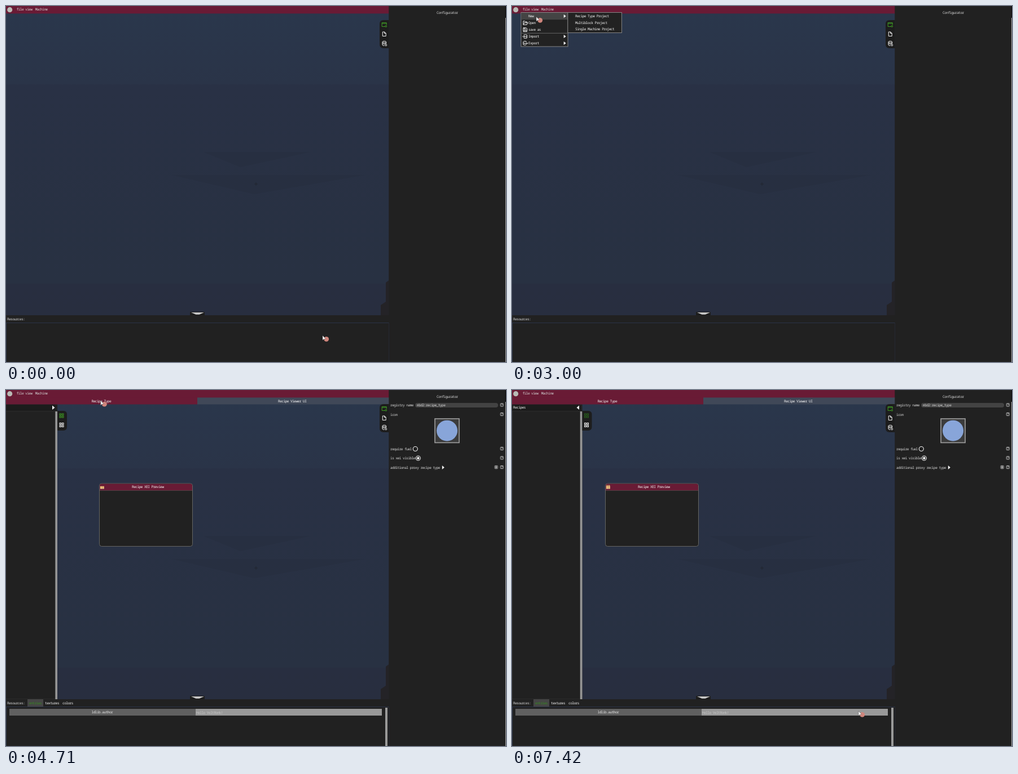
Write an HTML page that moves like this. It is 886 px wide and 632 px high and loops after 7.51 s.

```html
<!DOCTYPE html>
<html lang="en">
<head>
<meta charset="utf-8">
<title>Project editor</title>
<style>
  html, body { margin: 0; width: 100%; height: 100%; overflow: hidden; background: #212121; }
  svg { display: block; width: 886px; height: 632px; }
  text {
    font: 6.2px "Noto Sans Mono", "DejaVu Sans Mono", monospace;
    letter-spacing: -.57px; white-space: pre; text-rendering: geometricPrecision;
  }
</style>
</head>
<body>
<svg id="stage" viewBox="0 0 886 632" xmlns="http://www.w3.org/2000/svg"></svg>
<script>
const LOOP = 7510;
const DARK = '#212121', WINE = '#691b35', INK = '#d6d6d6', WHITE = '#f4f4f4', GREEN = '#3f9a24';

const rect = (x, y, w, h, fill, extra = '') =>
  `<rect x="${x}" y="${y}" width="${w}" height="${h}" fill="${fill}" ${extra}/>`;
const path = (d, fill, extra = '') => `<path d="${d}" fill="${fill}" ${extra}/>`;
const line = (d, color = WHITE, width = 1) => path(d, 'none', `stroke="${color}" stroke-width="${width}"`);
const circle = (x, y, r, fill, extra = '') => `<circle cx="${x}" cy="${y}" r="${r}" fill="${fill}" ${extra}/>`;
const label = (x, y, words, color = INK) => `<text x="${x}" y="${y + 2.1}" fill="${color}">${words}</text>`;
const group = (id, content, extra = '') => `<g id="${id}" ${extra}>${content}</g>`;
const rightArrow = (x, y, h = 3) => path(`M${x} ${y - h}l4 ${h}l-4 ${h}z`, WHITE);

function box(x, y, sign) {
  const mark = sign === '+'
    ? line(`M${x - 1.7} ${y}h3.4M${x} ${y - 1.7}v3.4`)
    : line(`M${x - 1.2} ${y - 1.2}q1.2 -1.4 2.3 0q0 .8 -1.1 1.4M${x} ${y + 1.1}v.8`, WHITE, .7);
  return rect(x - 2.5, y - 2.6, 5, 5.2, 'none', `rx=".7" stroke="${INK}" stroke-width=".8"`) + mark;
}

function tiles(x, y, color) {
  return [[-3.5, -3.5], [.8, -3.5], [-3.5, .8], [.8, .8]].map(([dx, dy]) =>
    rect(x + dx, y + dy, 2.7, 2.7, 'none', `stroke="${color}" stroke-width="1"`)).join('');
}

function background() {
  return `<defs>
    <linearGradient id="sky" gradientUnits="userSpaceOnUse" x1="0" y1="0" x2="0" y2="549">
      <stop offset="0" stop-color="#2a374c"/><stop offset=".253" stop-color="#2a3448"/>
      <stop offset=".255" stop-color="#293145"/><stop offset=".897" stop-color="#283142"/>
      <stop offset=".899" stop-color="#282e40"/><stop offset="1" stop-color="#282e3f"/>
    </linearGradient>
    <clipPath id="fill"><rect id="fillBox" x="166" width="9" height="8"/></clipPath>
  </defs>`
  + rect(0, 0, 886, 632, DARK) + rect(0, 13, 678.5, 536, 'url(#sky)')
  + path('M350 259H540L415 286zM294 300H636L440 334z', '#272f3f', 'opacity=".65"')
  + path('M664 549V531L673 525V491L678.5 487V549z', '#242327')
  + line('M440 316h6M443 313v6', '#20242c', .8);
}

function rightTabs() {
  return path('M678.5 25H669Q662 25 662 32V68Q662 75 669 75H678.5z', '#1d1d1d')
    + line('M672 36.5h-5.8v-6.8h8v4M666 31h8.5', GREEN) + circle(673.3, 36, 1.4, 'none', `stroke="${GREEN}"`)
    + line('M667.3 46h3.5l2.4 2.4v5.1h-5.9zM670.6 46v2.6h2.6')
    + line('M667 64v5q0 1.4 3.5 1.4M667 66.6q3 1.4 6.6 0v-2.6') 
    + `<ellipse cx="670.3" cy="63.8" rx="3.3" ry="1.4" fill="none" stroke="${WHITE}"/>`
    + circle(673.2, 69.3, 1.5, 'none', `stroke="${WHITE}"`);
}

function bottomBar() {
  return rect(0, 549, 678.5, 83, DARK)
    + rect(.5, 562.5, 678, 72, 'none', 'stroke="#2b3347"')
    + label(2, 555.5, 'Resources:')
    + path('M326 549V544l1 -1h24l1 1V549z', '#1d1d1d')
    + path('M328 544h23l-8.5 3.7h-6z', '#c9c9c9');
}

function menus() {
  const row = (y, words) => label(29, y, words, WHITE);
  return rect(16, 11.5, 83, 60.5, '#222', 'stroke="#858585"')
    + group('newRow', rect(16.5, 12, 82, 12.2, '#444'))
    + row(18, 'New') + row(30, 'Open') + row(42, 'save as') + row(54, 'Import') + row(66, 'Export')
    + line('M17 48.3h81', '#777', .8)
    + [18, 54, 66].map(y => rightArrow(91.7, y)).join('')
    + line('M20 33.2v-6.4h2.5l1 1.2h3v1.5M20 33.2l1.8 -3.5h6l-1.6 3.5z')
    + line('M20 38.7h5.2l1.3 1.3v5.3h-6.500zM21.700 38.700v2h2.800M21.700 45.300v-2.500h3v2.500')
    + line('M21 52v-.6q2.700 -1 5.500 0v5.500q-2.800 1.200 -5.500 0v-.6M22 54.300q2 .8 4.500 0M18.500 54.200h4l-1.500 -1.500m1.500 1.500l-1.500 1.500')
    + line('M25.500 64q.5 -1.500 -2.500 -1.500q-3 0 -3 1v5q3 1.600 5.500 0M20 65.600q2 1 3 .7M22.500 66.300h5l-1.500 -1.500m1.500 1.500l-1.500 1.500')
    + group('submenu', rect(98.8, 11.5, 95.6, 36, '#222', 'stroke="#858585"')
      + rect(99.3, 12, 94.6, 11.7, '#444', 'id="subRow"')
      + label(112, 18, 'Recipe Type Project', WHITE)
      + label(112, 29.5, 'Multiblock Project', WHITE)
      + label(112, 41, 'Single Machine Project', WHITE));
}

function configurator() {
  return label(681, 27, 'registry name') + rect(725, 23, 147, 8, '#434343', 'rx="4"')
    + label(728, 27, 'mbd2:recipe_type')
    + label(681, 43.5, 'icon')
    + rect(760, 51, 43, 42.5, '#3c3c3c', 'stroke="#a0a0a0" stroke-width="1.6"')
    + circle(781.5, 72.200, 18.500, '#88a5d9')
    + label(681, 104.5, 'require fuel') + circle(725.3, 104.5, 4, 'none', `stroke="${WHITE}" stroke-width="1.100"`)
    + label(681, 121, 'is xei visible') + circle(730.3, 121, 4, 'none', `stroke="${WHITE}" stroke-width="1.100"`)
    + circle(730.3, 121, 2.2, WHITE)
    + label(681, 137.5, 'additional proxy recipe type') + rightArrow(772.800, 137.5, 3.500)
    + [26.5, 43, 104, 120.5, 137].map(y => box(878.700, y, '?')).join('') + box(868.600, 137, '+');
}

function resources() {
  return rect(38, 549, 28, 13, '#454545') + label(41, 555.5, 'entries', '#35891f')
    + label(69, 555.5, 'textures', WHITE) + label(100, 555.5, 'colors', WHITE)
    + rect(6, 566, 330, 12, '#606060') + rect(336, 566, 330, 12, '#999')
    + label(151.500, 572, 'ldlib.author', '#e6e6e6') + label(337, 572.5, 'Hello VeltRonk!', '#c6c6c6')
    + rect(672, 564, 4, 68, '#999');
}

function preview() {
  const flame = x => path(`M${x} 175.500v-4.500l1 -3.300l1.200 3.300v4.500z`, '#f0c77d');
  return rect(165.5, 166, 165, 111.5, DARK, 'rx="4" stroke="#6c6c68" stroke-width=".9"')
    + path('M166 178.500V170Q166 166.500 169.500 166.500H326.500Q330 166.500 330 170V178.500z', WINE)
    + line('M166 178.500h164', '#555', .6)
    + label(223, 171.7, 'Recipe XEI Preview', WHITE)
    + [167, 169.400, 171.800].map(x => rect(x, 174, 1.500, 1.500, '#ddd')).join('')
    + group('flames', [167, 169.300, 171.600].map(flame).join(''), 'clip-path="url(#fill)"');
}

function sidePanel() {
  return rect(-4, 25.5, 128.5, 523.5, DARK) + rect(-4, 25.5, 124.500, 12, '#1c1c1c')
    + rect(.3, 37.8, 120.400, 511, 'none', 'stroke="#343434" stroke-width=".7"')
    + rect(120.800, 38, 3.700, 511, '#959595')
    + label(2, 31.2, 'Recipes', WHITE)
    + path('M115.500 27.500l4.500 3.700l-4.500 3.700z', WHITE, 'id="openArrow"')
    + path('M119 27.500l-4.500 3.700l4.500 3.700z', WHITE, 'id="closeArrow"')
    + path('M124.500 37H135Q141.500 37 141.500 43.500V65.500Q141.500 72 135 72H124.500z', '#1d1d1d')
    + group('tileBright', tiles(132, 45.500, GREEN)) + group('tileDim', tiles(132, 45.500, '#28601e'))
    + tiles(132, 62, WHITE);
}

document.getElementById('stage').innerHTML = background()
  + group('project', group('preview', preview()) + group('panel', sidePanel())
    + rect(0, 13, 339, 12.500, WINE) + rect(339, 13, 339.500, 12.500, '#404858')
    + label(151.500, 19.400, 'Recipe Type', WHITE) + label(482, 19.400, 'Recipe Viewer UI', WHITE))
  + rect(0, 0, 678.5, 13.4, WINE) + circle(6.7, 6.7, 4.6, '#b9b9b5')
  + rect(32, 0, 17, 13.4, '#a77b8a', 'id="barHover"')
  + label(18.5, 6.3, 'file') + label(34, 6.3, 'view') + label(51.7, 6.3, 'Machine')
  + rightTabs() + bottomBar()
  + rect(678.5, 0, 207.5, 632, DARK) + label(763, 12.2, 'Configurator')
  + rect(884.800, 0, 1.200, 21, '#080808') + rect(885, 21, 1, 611, '#a8a8a8')
  + group('details', configurator() + resources())
  + group('menus', menus())
  + group('cursor', circle(6.7, 6.3, 4.4, '#d0857c')
    + path('M0 0V8.300L2 6.500L5.600 5.700z', WHITE, 'stroke="#333" stroke-width=".4"'));

const ui = {};
document.querySelectorAll('#stage [id]').forEach(node => ui[node.id] = node);
const show = (node, on) => node.setAttribute('visibility', on ? 'inherit' : 'hidden');

// time, x, y of the pointer tip
const route = [
  [0, 561, 585], [40, 561, 585], [250, 151, 57], [450, 151, 57], [560, 131, 4], [620, 125, -20],
  [770, 104, -20], [800, 99, 3], [1000, 76, 11], [1450, 33, 9], [1900, 33, 9],
  [2410, 29, 6], [2820, 29, 6], [3000, 43, 19], [3290, 52, 21], [3530, 52, 21],
  [3900, 112, 27], [4320, 167, 17], [4700, 167, 17], [4890, 179, 49], [4980, 188, 58],
  [5260, 351, 340], [5560, 351, 340], [6190, 387, 357], [6290, 395, 358], [6350, 395, 358],
  [7090, 424, 288], [7190, 470, 362], [7300, 590, 501], [7420, 614, 570], [LOOP, 614, 570]
];

function pointerAt(t) {
  const i = route.findIndex(stop => stop[0] > t);
  const [t0, x0, y0] = route[i - 1], [t1, x1, y1] = route[i];
  const u = (t - t0) / (t1 - t0);
  return [x0 + (x1 - x0) * u, y0 + (y1 - y0) * u];
}

function easeOut(t, start, duration) {
  const u = Math.min(1, Math.max(0, (t - start) / duration));
  return 1 - (1 - u) ** 2;
}

function draw(t) {
  const [x, y] = pointerAt(t);
  const menuOpen = t >= 2820 && t < 4510, projectOpen = t >= 4510;
  ui.cursor.setAttribute('transform', `translate(${x} ${y})`);

  const button = [[16, 32], [32, 49], [49, 77]].find(([a, b]) => x >= a && x < b);
  const hover = !menuOpen && !projectOpen && y >= 0 && y < 13 && button;
  show(ui.barHover, hover);
  if (hover) {
    ui.barHover.setAttribute('x', button[0]);
    ui.barHover.setAttribute('width', button[1] - button[0]);
  }

  show(ui.menus, menuOpen);
  const inMenu = y >= 12, inSubmenu = x >= 99;
  show(ui.newRow, menuOpen && inMenu && !inSubmenu);
  show(ui.submenu, menuOpen && inMenu);
  show(ui.subRow, menuOpen && inSubmenu);
  ui.subRow.setAttribute('y', 12 + 11.7 * Math.max(0, Math.floor((y - 12) / 11.7)));

  show(ui.project, projectOpen);
  show(ui.details, projectOpen);
  const slide = easeOut(t, 4474, 500), zoom = easeOut(t, 4474, 170), settled = slide === 1;
  ui.panel.setAttribute('transform', `translate(${-121 * (1 - slide)} 0)`);
  ui.preview.setAttribute('transform', `translate(248 222) scale(${zoom}) translate(-248 -222)`);
  show(ui.openArrow, projectOpen && !settled);
  show(ui.closeArrow, projectOpen && settled);
  show(ui.tileBright, projectOpen && !settled);
  show(ui.tileDim, projectOpen && settled);

  // the flames fill upward every two seconds
  const filled = 8 * ((t + 500) % 2000) / 2000;
  ui.fillBox.setAttribute('y', 175.5 - filled);
  ui.fillBox.setAttribute('height', filled);
}

const begin = performance.now();
function tick() {
  draw((performance.now() - begin) % LOOP);
  requestAnimationFrame(tick);
}
tick();
</script>
</body>
</html>
```
